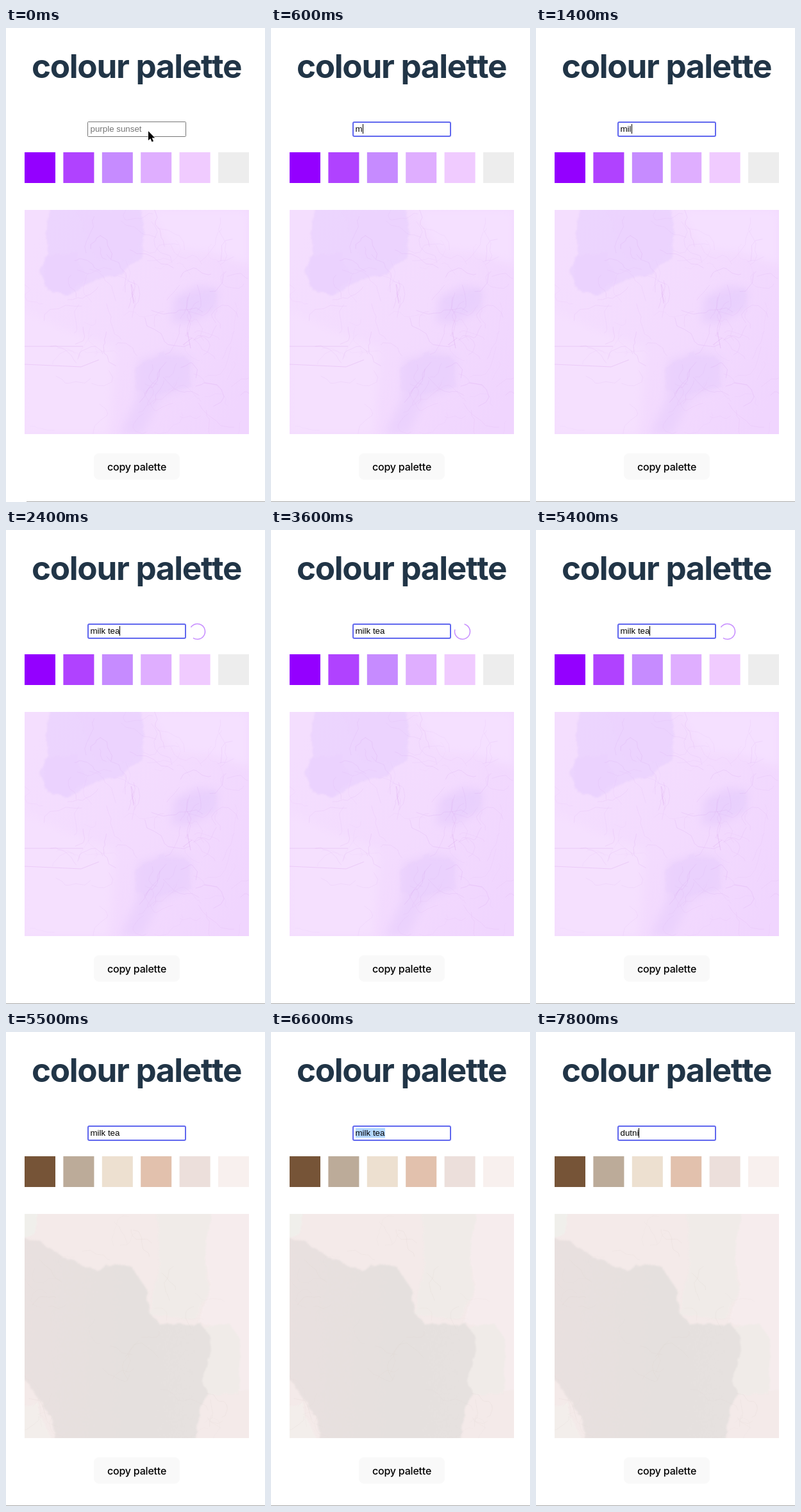
Recreate the animation shown at these times as an HTML page. Size 404 by 740 pixels, loop 8 s.

```html
<!DOCTYPE html>
<html lang="en">
<head>
<meta charset="utf-8">
<title>colour palette</title>
<style>
  html, body { margin: 0; width: 404px; height: 740px; overflow: hidden; background: #fff; }
  svg { display: block; }
  .head { font: 700 51.2px Inter, sans-serif; letter-spacing: -1.3px; fill: #213547; }
  .button { font: 500 16px Inter, sans-serif; letter-spacing: -.2px; }
  .field { font: 13.333px "Liberation Sans", Arial, sans-serif; white-space: pre; }
</style>
</head>
<body>
<svg width="404" height="740" viewBox="0 0 404 740">
  <defs>
    <clipPath id="frame"><rect x="29" y="284" width="350" height="350"/></clipPath>
    <filter id="rough" x="-20%" y="-20%" width="140%" height="140%" color-interpolation-filters="sRGB">
      <feTurbulence type="fractalNoise" baseFrequency=".045" numOctaves="3" seed="4" result="noise"/>
      <feDisplacementMap in="SourceGraphic" in2="noise" scale="12" xChannelSelector="R" yChannelSelector="G"/>
      <feGaussianBlur stdDeviation="1.3"/>
    </filter>
    <filter id="soft" x="-30%" y="-30%" width="160%" height="160%"><feGaussianBlur stdDeviation="7"/></filter>
    <linearGradient id="lilac" x1="0" y1=".2" x2="1" y2=".8">
      <stop stop-color="#f4defe"/><stop offset=".55" stop-color="#f3dbfe"/><stop offset="1" stop-color="#f0d5fe"/>
    </linearGradient>
    <linearGradient id="clay"><stop stop-color="#e9e0df"/><stop offset=".6" stop-color="#e5e0de"/><stop offset="1" stop-color="#e6e1df"/></linearGradient>
  </defs>

  <text class="head" x="203.5" y="78" text-anchor="middle">colour palette</text>
  <rect id="box" fill="#fff"/>
  <rect id="mark" x="132" y="150" height="15" fill="#b3d7ff"/>
  <text id="typed" class="field" x="131.5" y="162"></text>
  <rect id="caret" y="150" width="1" height="15"/>
  <circle id="spinner" cx="298.5" cy="158.5" r="12" fill="none" stroke="#c68bff" stroke-width="1.5" pathLength="360" stroke-dasharray="270 90"/>
  <g id="swatches"></g>
  <g clip-path="url(#frame)">
    <g id="sunset">
      <rect x="29" y="284" width="350" height="350" fill="url(#lilac)"/>
      <g filter="url(#soft)">
        <path d="M225 284H379V370L320 350 260 345Z" fill="#f5e0ff"/>
        <path d="M29 440 90 470 170 500 160 634H29Z" fill="#f5e0fe"/>
        <path d="M262 420 300 402 332 408 326 440 285 462 258 460Z" fill="#ead0fd"/>
        <path d="M206 520 258 504 290 515 286 560 240 580 214 634H178L204 580Z" fill="#ebd2fd"/>
      </g>
      <g filter="url(#rough)" fill="#e9d0fd">
        <path d="M70 278H208L219 320 210 360 180 385 140 392 110 408 90 416 64 408 52 382 66 352 62 315Z" opacity=".65"/>
        <path d="M108 284H205L218 325 195 366 140 360Z" opacity=".35"/>
        <path d="M60 358 110 350 125 390 90 416 58 402Z" opacity=".5"/>
        <path d="M202 530 240 508 286 518 288 560 230 572 205 565Z" opacity=".5"/>
        <path d="M270 425 325 405 330 435 290 450Z" opacity=".35"/>
      </g>
    </g>
    <g id="milk">
      <rect x="29" y="284" width="350" height="350" fill="#f4eae9"/>
      <g filter="url(#rough)">
        <path d="M232 270H322L310 350 318 400 295 450 225 440 240 350Z" fill="#f0ebe8"/>
        <path d="M322 270H395V560H362L350 470 300 455 320 395 310 350Z" fill="#f6eced"/>
        <path d="M300 465 350 455 364 480 362 565H305Z" fill="#f0ebe8"/>
        <path d="M15 270H52L45 315 15 325Z" fill="#f0efeb"/>
        <path d="M15 585 50 580 75 650H15Z" fill="#f3eeeb"/>
        <path d="M15 318 45 324 78 346 140 372 155 363 198 368 221 405 222 436 242 458 302 457 318 472 319 505 306 540 313 562 299 595 297 650H80L66 590 30 545 15 540Z" fill="url(#clay)"/>
      </g>
    </g>
  </g>
  <rect x="137" y="664" width="134" height="41" rx="8" fill="#f9f9f9"/>
  <text class="button" x="204" y="691" text-anchor="middle">copy palette</text>
  <rect id="edge" y="739" height="1" fill="#aaa"/>
  <path id="pointer" d="M222 161V175.5L225.3 172.4 227.6 177.8 230 176.8 227.7 171.5H232.2Z" stroke="#fff" stroke-width="1.2" paint-order="stroke"/>
</svg>
<script>
const LOOP = 8000, STEP = 100, SPIN = 1000;
const $ = id => document.getElementById(id);
const set = (el, attrs) => Object.entries(attrs).forEach(([k, v]) => el.setAttribute(k, v));
const show = (id, on) => { $(id).style.display = on ? '' : 'none'; };

function add(parent, tag, attrs) {
  const el = document.createElementNS('http://www.w3.org/2000/svg', tag);
  set(el, attrs);
  return parent.appendChild(el);
}

let seed = 17;
const rand = (a, b) => {
  seed = (seed * 16807) % 2147483647;
  return a + (b - a) * seed / 2147483647;
};

// Thin wandering cracks around a centre.
function cracks(parent, x, y, spread, count, color) {
  for (let i = 0; i < count; i++) {
    let px = x + rand(-spread, spread), py = y + rand(-spread, spread);
    let angle = rand(0, 6.28), d = `M${px} ${py}`;
    for (let n = rand(3, 8); n > 0; n--) {
      angle += rand(-.9, .9);
      const len = rand(3, 14);
      px += len * Math.cos(angle);
      py += len * Math.sin(angle);
      d += `L${px.toFixed(1)} ${py.toFixed(1)}`;
    }
    add(parent, 'path', { d, fill: 'none', stroke: color, 'stroke-width': .7, opacity: rand(.12, .4) });
  }
}

const clusters = [[150, 365, 25], [120, 525, 20], [284, 488, 9], [265, 355, 20], [340, 385, 25],
  [195, 405, 12], [300, 440, 30], [330, 580, 40], [240, 550, 30], [130, 450, 30]];
clusters.forEach(([x, y, r]) => cracks($('sunset'), x, y, r, 6, '#d9a8ee'));
cracks($('sunset'), 204, 459, 170, 45, '#e2b8f2');
add($('sunset'), 'path', { d: 'M29 525 117 529 145 518M29 497H120M283 475 288 500M276 495 290 484M195 400 199 430',
  fill: 'none', stroke: '#d49ce9', 'stroke-width': .7, opacity: .45 });
[[80, 405, 40], [165, 515, 35], [200, 325, 45], [270, 430, 40], [45, 600, 20], [335, 590, 30]]
  .forEach(([x, y, r]) => cracks($('milk'), x, y, r, 7, '#ddd2cd'));

const palettes = [
  ['#9400ff', '#b042ff', '#c68bff', '#dfaeff', '#f0cbff', '#ededed'],
  ['#765437', '#bcab99', '#ede0d0', '#e2c1ad', '#ecdfdb', '#f8f0ee']
];
const swatches = palettes[0].map((c, i) =>
  add($('swatches'), 'rect', { x: 29 + 60.4 * i, y: 194, width: 48, height: 48 }));

// Each entry: time, text in the field.
const keys = [[100, ''], [500, 'm'], [1100, 'mi'], [1400, 'mil'], [1500, 'milk'], [1700, 'milk '],
  [1900, 'milk te'], [2000, 'milk tea'],
  [7400, 'd'], [7500, 'du'], [7600, 'dut'], [7700, 'dutn'], [7800, 'dutni']];

function draw(now) {
  const t = Math.floor(now % LOOP / STEP) * STEP;
  const focused = t >= 100, loaded = t >= 5500;
  const [since, text] = keys.filter(k => k[0] <= t).pop() || [0, ''];
  const selected = t >= 6600 && t < 7400;

  set($('box'), focused
    ? { x: 128, y: 147, width: 152, height: 22, rx: 2, stroke: '#6067ee', 'stroke-width': 2 }
    : { x: 127.5, y: 146.5, width: 153, height: 23, rx: 1, stroke: '#767676', 'stroke-width': 1 });
  const typed = $('typed');
  typed.textContent = text || 'purple sunset';
  typed.setAttribute('fill', text ? '#000' : '#757575');
  const width = text ? typed.getComputedTextLength() : 0;
  $('caret').setAttribute('x', Math.round(131.5 + width));
  show('caret', focused && !selected && (t - since) % 1000 < 500);
  $('mark').setAttribute('width', Math.round(width));
  show('mark', selected);

  const gap = 90 + 360 * (t - 2183) / SPIN;
  $('spinner').setAttribute('transform', `rotate(${gap + 45} 298.5 158.5)`);
  show('spinner', t >= 2200 && !loaded);
  show('pointer', t < 500);
  set($('edge'), focused ? { x: 0, width: 404 } : { x: 32, width: 372 });

  swatches.forEach((s, i) => s.setAttribute('fill', palettes[+loaded][i]));
  show('sunset', !loaded);
  show('milk', loaded);
}

const start = performance.now();
function tick() {
  draw(performance.now() - start);
  requestAnimationFrame(tick);
}
tick();
</script>
</body>
</html>
```
